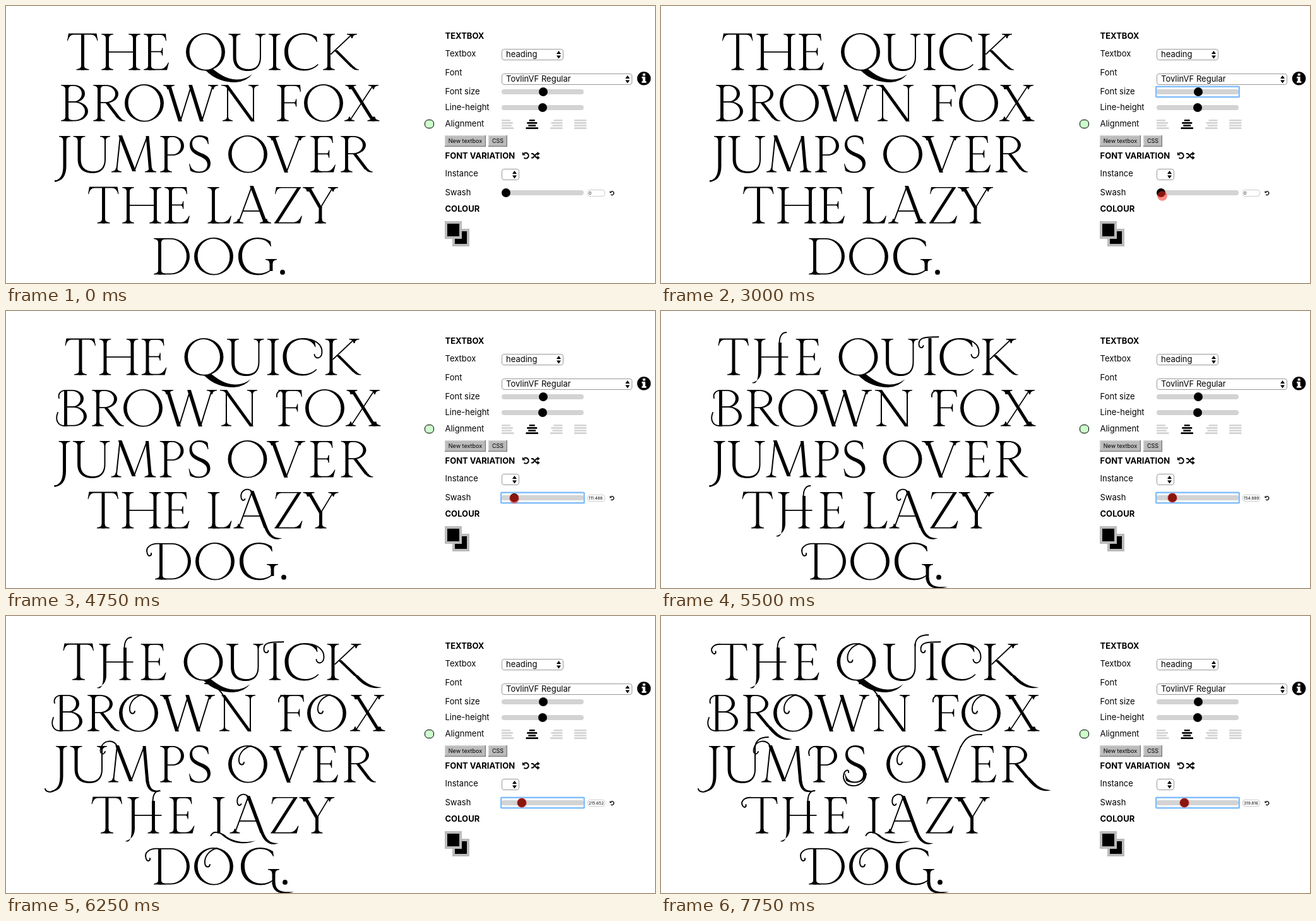
Write an HTML page that moves like this. It is 1028 px wide and 439 px high and loops after 8 s.

```html
<!DOCTYPE html>
<html lang="en">
<head>
<meta charset="utf-8">
<title>Variable font swash demo</title>
<style>
html, body { margin: 0; width: 100%; height: 100%; overflow: hidden; background: #fff; }
svg { display: block; width: 1028px; height: 439px; font: 13px Inter, "Open Sans", sans-serif; }
.b { font-weight: 700; }
.curl { fill: none; stroke: #000; stroke-width: 1.9; stroke-linecap: round; }
.box { fill: #fff; stroke: #999; }
.ring { fill: none; stroke: #84c0fb; stroke-width: 2.6; }
.small { font-size: 9px; text-anchor: middle; }
.icon { fill: none; stroke: #000; stroke-width: 2; }
</style>
</head>
<body>
<svg viewBox="0 0 1028 439">
  <g id="words" role="img" aria-label="The quick brown fox jumps over the lazy dog."></g>
  <g id="panel"></g>
  <rect id="sizeRing" class="ring" x="784.2" y="127.8" width="131.6" height="16.4" rx="1"/>
  <rect id="swashRing" class="ring" x="784.2" y="287.8" width="131.6" height="16.4" rx="1"/>
  <circle id="knob" cx="792" cy="296" r="7"/>
  <text id="value" x="923" y="299" font-size="6.5">0</text>
  <circle id="pointer" r="7.8" fill="#fa281e" fill-opacity=".55"/>
</svg>
<script>
(() => {
const $ = id => document.getElementById(id);
const BASE = 57.5;

// Letter parts. Each returns path data; a leading "~" marks a hairline curl.
const serif = (x, y, d, w = 9, k = 2.4) =>
  `M${x - w} ${y}H${x + w}v${d * 1.3}Q${x + k} ${y + d * 2} ${x + k} ${y + d * 7}H${x - k}Q${x - k} ${y + d * 2} ${x - w} ${y + d * 1.3}z`;
const head = (x, w = 9, k = 1) => serif(x, 0, 1, w, k);
const foot = (x, w = 9, k = 1) => serif(x, BASE, -1, w, k);
const shaft = (x, a = 0, b = BASE, w = 4.9) => `M${x - w / 2} ${a}h${w}V${b}h${-w}z`;
const stem = x => [shaft(x), head(x, 9.3, 2.4), foot(x, 9.3, 2.4)];
const diag = (x0, y0, x1, y1, w = 5.8) => `M${x0 - w / 2} ${y0}h${w}L${x1 + w / 2} ${y1}h${-w}z`;
const bar = (x0, x1, y) => `M${x0} ${y}H${x1}v1.8H${x0}z`;
const topArm = (x0, x1) => `M${x0} 0H${x1}l1 11h-1Q${x1 - 1.5} 1.8 ${x1 - 9} 1.8H${x0}z`;
const midArm = x => bar(9, x, 27.5) + `M${x - 1} 22.5h1.3v12h-1.3q0-5-4-6q4-1 4-6z`;
const lowArm = (x0, x1) => `M${x0} ${BASE}H${x1}l3 -12h-1Q${x1 - 3} 55.7 ${x1 - 10} 55.7H${x0}z`;
const bowl = (a, x, y0, y1) => {
  const r = x - a, h = (y1 - y0) / 2;
  return `M9 ${y0}H${a}A${r} ${h} 0 0 1 ${a} ${y1}H9v-1.8H${a}A${r - 5} ${h - 1.8} 0 0 0 ${a} ${y0 + 1.8}H9z`;
};
// Tapering stroke from (x,y) to (u,v).
const sweep = (x, y, a, b, c, d, u, v, w = 5) =>
  `M${x + w / 2} ${y}C${a + w / 2} ${b} ${c} ${d - w / 2} ${u} ${v}C${c} ${d + w / 2} ${a - w / 2} ${b + w / 2} ${x - w / 2} ${y}z`;
const round = 'M31 -1A31 29.8 0 0 1 31 58.6A31 29.8 0 0 1 31 -1zM31 .8A25.4 28 -6 0 0 31 56.8A25.4 28 -6 0 0 31 .8z';
const inner = '~M36 0C24 3 16 13 17 24C18 31 24 31 25 26';
const cShape = 'M52 13L51 5Q42 -1 31 -1C13 -1 0 11 0 29C0 47 13 58.5 31 58.5Q45 58.5 54 49L53 48Q44 56 33 56C17 56 6 45 6 28C6 12 16 1.3 31 1.3Q46 1.5 51 13z';
const leg = (x, y, x1) => [diag(x, y, x1 - 8, 53), `M${x1 - 11} 52h5.6Q${x1 - 3} 56 ${x1 + 2} 56.4V57.5H${x1 - 2}Q${x1 - 7} 57 ${x1 - 11} 52z`];

const glyphs = {
  A: on => [diag(29, 0, 8, 57, 2), diag(29, -2, 51, 57), bar(15, 44, 37), foot(8, 8),
    ...on ? ['~M29 -1C22 -8 10 -3 12 9C13 14 17 14 18 11', sweep(51, 56, 56, 68, 64, 76, 77, 73)] : [foot(51, 9, 2.6)]],
  B: on => [...on ? [shaft(9.5), '~M9 .9C2 1 -3 6 -1 13', '~M12 56.6C-2 59 -8 49 -3 36'] : stem(9.5),
    bowl(20, 38, 0, 28), bowl(22, 43, 26.3, BASE)],
  C: on => [cShape, ...on ? ['~M31 0C50 -1 63 9 62 22C61 32 51 33 50 25'] : []],
  D: on => [...on ? [shaft(9.5), foot(9.5, 9.3, 2.4), '~M10 .9C-7 -1 -16 7 -12 17C-10 22 -5 20 -6 16'] : stem(9.5), bowl(27, 57, 0, BASE)],
  E: () => [...stem(9.5), topArm(9, 35), midArm(30), lowArm(9, 37)],
  F: on => [...stem(9.5), topArm(9, 37), midArm(31), ...on ? ['~M9 .9C2 0 -3 4 -2 11'] : []],
  G: on => [cShape, shaft(52, 33, on ? 57 : 52), serif(52, 33, 1, 9, 2.4), ...on ? [sweep(52, 55, 53, 67, 63, 73, 84, 69)] : []],
  H: on => on
    ? [shaft(12, 0, 50), head(12, 9, 2.4), sweep(12, 49, 12, 63, 7, 70, -1, 70), shaft(44, 6), foot(44, 9, 2.4), '~M43 8C43 -4 47 -10 54 -10', bar(12, 57, 28)]
    : [...stem(9.5), ...stem(52.5), bar(9, 53, 28)],
  I: on => on ? [shaft(9.5, -1), foot(9.5, 9, 2.4), '~M23 -3C10 -2 -8 -5 -8 8C-8 15 -2 16 -1 11'] : stem(9.5),
  J: on => [head(16, 9, 2.4), 'M13.5 0V48C13.5 62 9 69 0 71v1.5C12 72 18.5 63 18.5 48V0z', on ? '~M4 71C-1 74 -9 73 -10 68' : 'M0 70h3v2.5h-3z'],
  K: on => [...stem(9.5), diag(46, 1, 12, 33, 2.6), head(46, 8),
    ...on ? [diag(20, 26, 46, 51), sweep(46, 50, 57, 61, 69, 71, 87, 69, 5.8)] : leg(20, 26, 55)],
  L: on => [shaft(9.5), head(9.5, 9.3, 2.4),
    ...on ? ['~M-3 61C1 52 12 56 20 62', sweep(14, 58, 28, 70, 47, 76, 68, 69, 4)] : [foot(9.5, 9, 2.4), lowArm(9, 35)]],
  M: on => [diag(14, 0, 8, 57, 2), diag(14, -1, 36, 56), diag(36, 56, 57, 0, 2), diag(57, 0, 62, 57, 5), foot(8, 8),
    ...on ? ['~M14 0C8 -11 -8 -10 -12 4C-14 13 -7 15 -5 9', sweep(62, 56, 64, 68, 70, 74, 84, 71)] : [foot(62, 9, 2.4)]],
  N: on => [shaft(10, 0, BASE, 2), diag(8, 0, 50, 58), shaft(51, 0, 58, 2), foot(10, 8), head(51, 8),
    on ? '~M9 2C1 -11 -9 -18 -21 -18' : 'M0 0H9L11 6Q7 1.3 0 1.3z'],
  O: on => [round, ...on ? [inner] : []],
  P: on => [...stem(9.5), bowl(20, 38, 0, 31), ...on ? ['~M10 .9C-4 -1 -9 7 -6 15'] : []],
  Q: on => [round, 'M31 58C45 72 62 77 78 77Q96 76 105 64Q94 73 80 72.5C64 72 52 63 43 56z', ...on ? [inner] : []],
  R: on => [...stem(9.5), bowl(20, 40, 0, 29),
    ...on ? [diag(22, 28, 41, 51), sweep(41, 50, 51, 61, 61, 72, 78, 70, 5.8)] : leg(22, 28, 49)],
  S: on => ['M30 3L31 13H30C28 5 23 1.5 16.5 1.5C9 1.5 5 6 5 12C5 30 34 24 34 43C34 53 26 58.5 16 58.5C10 58.5 5 57 2 55L0 44H1C3 52 8 56.5 16 56.5C24 56.5 29 52 29 45C29 30 1 34 1 14C1 5 8 -1 17 -1C22 -1 27 0 30 3z',
    ...on ? ['~M34 44C33 57 22 64 12 63C0 62 -5 50 0 41C3 37 7 38 6 42'] : []],
  T: on => [shaft(24.5), foot(24.5, 10, 2.4),
    ...on ? [topArm(24, 48), '~M25 .9H8C-5 0 -10 8 -6 14C-3 18 0 15 -1 12'] : ['M2 -.5H46.5L48.5 11h-1Q45 1.6 38 1.6H10Q3.5 1.6 1 11H0z']],
  U: on => ['M7.6 0V37C7.6 52 17 59 31 59C45 59 52 51 52 37V0h-2V37C50 50 43 56 32.5 56C20 56 12.6 50 12.6 37V0z',
    head(10, 9.5, 2.4), on ? '~M51 3C51 -8 58 -14 72 -14' : head(51, 8)],
  V: on => [diag(10, 0, 31, 58), diag(31, 58, 53, 0, 2), head(10, 9.5, 2.6), on ? '~M53 1C60 -13 68 -19 86 -18' : head(53, 8.5)],
  W: () => [diag(10, 0, 28, 58), diag(28, 58, 45, 3, 2), diag(44, 0, 62, 58), diag(62, 58, 80, 0, 2), head(10, 9, 2.6), head(80, 8)],
  X: () => [diag(10, 0, 46, BASE), diag(46, 0, 8, BASE, 2), head(10, 8.5, 2.6), head(46, 8), foot(8, 8), foot(46, 9.5, 2.6)],
  Y: () => [diag(9, 0, 28, 33), diag(48, 0, 28, 33, 2), shaft(28, 31), head(9, 9, 2.6), head(48, 8), foot(28, 9, 2.4)],
  Z: () => ['M4 0H43V1.6H12Q5 1.6 3 11H2z', diag(40, 1, 4, 57, 5.6), lowArm(1, 42)],
  '.': () => ['M4 50a3.9 3.9 0 0 1 0 7.8a3.9 3.9 0 0 1 0 -7.8z']
};

// Extra advance taken by swash forms.
const extra = { C: 6, D: 4, E: 1, F: 4, H: 2, I: 4, L: -14, M: 5, N: 6, O: 4, Q: 6, P: 4, S: 4, R: -2 };
const padLeft = 'DFI';
const rows = [
  ['THEQUICK', 44, [97, 151, 218, 285, 352, 416, 441, 502]],
  ['BROWNFOX', 125, [87, 138, 188, 248, 341, 429, 472, 536]],
  ['JUMPSOVER', 206, [77, 106, 167, 244, 290, 352, 413, 482, 530]],
  ['THELAZY', 287, [130, 184, 251, 319, 360, 424, 470]],
  ['DOG.', 368, [234, 298, 368, 434]]
];
const draw = parts => parts.map(d => d[0] === '~' ? `<path class="curl" d="${d.slice(1)}"/>` : `<path d="${d}"/>`).join('');
const NS = 'http://www.w3.org/2000/svg';
const lines = rows.map(([word, y, xs]) => [...word].map((ch, i) => {
  const g = $('words').appendChild(document.createElementNS(NS, 'g'));
  g.innerHTML = `<g>${draw(glyphs[ch](false))}</g><g>${draw(glyphs[ch](true))}</g>`;
  return { ch, y, x: xs[i], g };
}));

// Swash forms switch on in alphabetical order.
function setLetters(count) {
  for (const line of lines) {
    const isOn = l => l.ch !== '.' && l.ch.charCodeAt(0) - 65 < count;
    const pads = line.map(l => isOn(l) ? extra[l.ch] || 0 : 0);
    let dx = -pads.reduce((a, b) => a + b, 0) / 2;
    line.forEach((l, i) => {
      const before = padLeft.includes(l.ch);
      if (before) dx += pads[i];
      l.g.setAttribute('transform', `translate(${l.x + dx} ${l.y})`);
      if (!before) dx += pads[i];
      l.g.children[0].style.display = isOn(l) ? 'none' : '';
      l.g.children[1].style.display = isOn(l) ? '' : 'none';
    });
  }
}

// Control panel
const text = (s, x, y, cls = '') => `<text x="${x}" y="${y}" class="${cls}">${s}</text>`;
const rect = (x, y, w, h, fill, r = 0) => `<rect x="${x}" y="${y}" width="${w}" height="${h}" rx="${r}" fill="${fill}"/>`;
const select = (x, y, w, s) => `<rect class="box" x="${x + .5}" y="${y + .5}" width="${w - 1}" height="17" rx="3.5"/>` +
  text(s, x + 7, y + 13) + `<path d="M${x + w - 11} ${y + 8}l3.5-5 3.5 5zM${x + w - 11} ${y + 10.5}l3.5 5 3.5-5z"/>`;
const track = y => rect(785, y - 4, 130, 8, '#d3d3d3', 4);
const button = (s, x, w) => rect(x, 205, w, 18, '#777') + rect(x, 205, w - 1.5, 16.5, '#d0d0d0') +
  rect(x + 1.5, 206.5, w - 3, 15, '#bbb') + text(s, x + w / 2, 217.2, 'small');
const align = (x, widths, anchor, fill) => widths.map((w, i) => rect(x + (19.5 - w) * anchor, 180 + i * 4.1, w, 2.6, fill, .5)).join('');
const undo = (x, y, s) => `<g transform="translate(${x} ${y}) scale(${s})"><path class="icon" d="M-3 -3.2A4.4 4.4 0 1 1 -3 3.6"/><path d="M-5.6 -5.5V-.4H-.4z"/></g>`;
const swatch = (x, y) => rect(x, y, 27, 28, '#bbb') + rect(x + 4, y + 4, 19, 20, '#000');

$('panel').innerHTML = [
  text('TEXTBOX', 695.5, 52, 'b'), text('FONT VARIATION', 695.5, 242, 'b'), text('COLOUR', 695.5, 326, 'b'),
  ...[['Textbox', 80], ['Font', 110], ['Font size', 140], ['Line-height', 165], ['Alignment', 191], ['Instance', 270], ['Swash', 300]]
    .map(([s, y]) => text(s, 695.5, y)),
  select(785, 68, 98, 'heading'), select(785, 107, 207, 'TovlinVF Regular'), select(785, 258, 28, ''),
  track(136), track(161), track(296),
  '<circle cx="851" cy="136" r="7"/><circle cx="850" cy="161" r="7"/>',
  '<rect x="663.5" y="180.5" width="14" height="13" rx="5.5" fill="#cfc" stroke="#000"/>',
  align(785, [14, 18, 16, 19.5], 0, '#d3d3d3'), align(823.5, [9, 16, 12, 19.5], .5, '#000'),
  align(862, [14, 18, 16, 19.5], 1, '#d3d3d3'), align(900, [19.5, 19.5, 19.5, 19.5], 0, '#d3d3d3'),
  button('New textbox', 695, 65), button('CSS', 764, 30),
  undo(823.5, 237, 1), undo(960, 296.5, .65),
  '<path class="icon" d="M832 234h2.5l6 6.5h2M832 240.5h2.5l6-6.5h2"/><path d="M841.5 230.8l4.2 3.2-4.2 3.2zM841.5 237.3l4.2 3.2-4.2 3.2z"/>',
  '<rect x="921.5" y="291.5" width="27" height="10" rx="3.5" fill="#fff" stroke="#ccc"/>',
  '<circle cx="1010.5" cy="114.8" r="10.8"/><path fill="#fff" d="M1008.6 107h4v3.4h-4zM1007 112h5.6v7.2h1.7v2.6h-7.3v-2.6h1.6v-4.6h-1.6z"/>',
  swatch(707, 353), swatch(695, 341)
].join('');

// Linear interpolation through [key, value] points.
function lerp(points, k) {
  const i = points.findIndex(p => p[0] >= k);
  if (i < 0) return points[points.length - 1][1];
  if (i === 0) return points[0][1];
  const [a, u] = points[i - 1], [b, v] = points[i];
  return u + (v - u) * (k - a) / (b - a);
}
const steps = [[3000, 0], [3250, 1], [4000, 7], [5500, 18], [6250, 25], [7000, 30], [7750, 37]];
const reached = [[0, 0], [7, 4], [18, 9], [25, 15], [30, 19], [37, 22]];
const pathX = [[250, 743], [500, 751], [750, 768], [1000, 784], [1250, 792], [2000, 792], [2500, 786], [3000, 794]];
const pathY = [[250, 118], [500, 160], [750, 220], [1000, 270], [1250, 298], [1500, 303], [1750, 303], [2500, 324], [3000, 301], [4000, 299], [5500, 296]];

let shown = -1;
function frame(now) {
  const t = Math.floor(now % 8000 / 250) * 250;
  if (t !== shown) {
    shown = t;
    const n = Math.round(lerp(steps, t));
    setLetters(Math.floor(lerp(reached, n) + 1e-6));
    $('knob').setAttribute('cx', 792 + n);
    $('value').textContent = n ? (59.4056 + (n - 7) * 8.680333).toFixed(3) : '0';
    $('sizeRing').style.display = t >= 2000 && t < 3250 ? '' : 'none';
    $('swashRing').style.display = t >= 3250 ? '' : 'none';
    $('pointer').style.display = t >= 250 ? '' : 'none';
    $('pointer').setAttribute('cx', t > 3000 ? Math.max(794, 792 + n) : lerp(pathX, t));
    $('pointer').setAttribute('cy', lerp(pathY, t));
  }
  requestAnimationFrame(frame);
}
frame(performance.now());
})();
</script>
</body>
</html>
```
